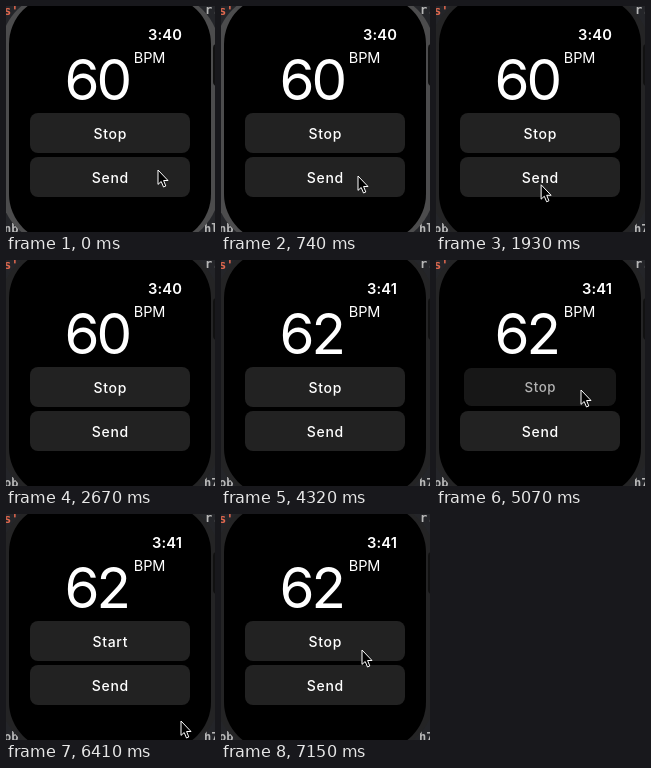
Animation of 209x226 px, one loop 8000 ms. Source, as an HTML page:

```html
<!DOCTYPE html>
<html lang="en">
<head>
<meta charset="utf-8">
<title>Watch pulse</title>
<style>
  html, body { margin: 0; width: 100%; height: 100%; overflow: hidden; background: #000; }
  svg { display: block; width: 209px; height: 226px; }
  text { font-family: Inter, Roboto, sans-serif; fill: #fff; }
  .label { font-size: 14px; font-weight: 500; letter-spacing: .65px; text-anchor: middle; }
  .code { font: bold 12px "DejaVu Sans Mono", monospace; fill: #b8b8b8; }
</style>
</head>
<body>
<svg viewBox="0 0 209 226">
  <rect width="209" height="226" fill="#242529"/>
  <text class="code" x="-2" y="9" style="fill:#e2694f">s'</text>
  <text class="code" x="199" y="8">r.</text>
  <text class="code" id="leftCode" x="-2" y="227"></text>
  <text class="code" id="rightCode" x="198" y="227"></text>
  <rect id="bezel" x="-6" y="-14" width="220" height="254" rx="60"/>
  <rect x="3" y="-10" width="202" height="246" rx="48"/>
  <rect x="207" y="38" width="8" height="42" rx="4" fill="#111"/>

  <text id="clock" x="176" y="34" font-size="14.7" font-weight="600" text-anchor="end" letter-spacing=".1"></text>
  <text id="pulse" x="58.6" y="93.8" font-size="56.5" letter-spacing="-3.2"></text>
  <text x="127.8" y="57" font-size="14.5" letter-spacing="-.1">BPM</text>

  <g id="top">
    <rect x="24" y="107" width="160" height="40" rx="8" fill="#222"/>
    <text class="label" id="toggle" x="104.3" y="132.5"></text>
  </g>
  <g id="bottom">
    <rect x="24" y="151" width="160" height="40" rx="8" fill="#222"/>
    <text class="label" x="104.3" y="176.5">Send</text>
  </g>

  <path id="cursor" d="M0 0V14.4L3.2 11.5L5.5 17L7.8 16L5.6 10.5H10Z"
        fill="#000" stroke="#fff" stroke-linejoin="round"/>
</svg>
<script>
  const LOOP = 8000, STEP = 148.9;
  const $ = id => document.getElementById(id);

  const linear = p => p;
  const easeIn = p => p ** 2.3;
  const easeOut = p => 1 - easeIn(1 - p);

  // Pointer moves; start and end are counted in steps.
  const onSend = [137, 170], below = [97, 181], onStop = [145, 130], away = [218, 318];
  const moves = [
    { start: 1, end: 5, from: [152, 164], to: onSend, ease: linear },
    { start: 12, end: 14, from: onSend, to: below, ease: easeOut },
    { start: 15, end: 18, from: below, to: [132, 184], ease: easeOut },
    { start: 29, end: 32, from: away, to: onStop, ease: easeOut },
    { start: 37, end: 40, from: onStop, to: away, ease: easeIn },
    { start: 42, end: 44, from: [209, 278], to: [141, 136], ease: linear }
  ];

  function pointerAt(step) {
    const { start, end, from, to, ease } = moves.findLast(m => m.start <= step) || moves[0];
    const p = ease(Math.min(1, Math.max(0, (step - start) / (end - start))));
    return from.map((v, i) => v + (to[i] - v) * p);
  }

  // 1 at the click, fading to 0 over the given number of steps.
  const pulse = (step, start, length) =>
    step < start ? 0 : Math.max(0, 1 - (step - start) / length);

  function press(id, cy, amount) {
    const k = 1 - .05 * amount;
    $(id).setAttribute("transform", `translate(104 ${cy}) scale(${k}) translate(-104 ${-cy})`);
    $(id).setAttribute("opacity", 1 - .3 * amount);
  }

  function draw(t) {
    const step = Math.floor(t / STEP + .08);
    const sent = step >= 8;
    const idle = step >= 18 && step < 29;

    $("bezel").setAttribute("fill", sent ? "#242425" : "#4c4c4d");
    $("leftCode").textContent = sent ? "ob" : "nb";
    $("rightCode").textContent = sent ? "h7" : "hl";
    $("clock").textContent = step < 29 ? "3:40" : "3:41";
    $("pulse").textContent = step < 21 ? "60" : "62";
    $("toggle").textContent = step >= 35 && step < 48 ? "Start" : "Stop";
    press("top", 127, pulse(step, 34, 2) + pulse(step, 47, 1));
    press("bottom", 171, pulse(step, 8, 2));

    $("cursor").setAttribute("visibility", idle ? "hidden" : "visible");
    $("cursor").setAttribute("transform", `translate(${pointerAt(step)})`);
  }

  function tick(now) {
    draw(now % LOOP);
    requestAnimationFrame(tick);
  }
  draw(0);
  requestAnimationFrame(tick);
</script>
</body>
</html>
```
